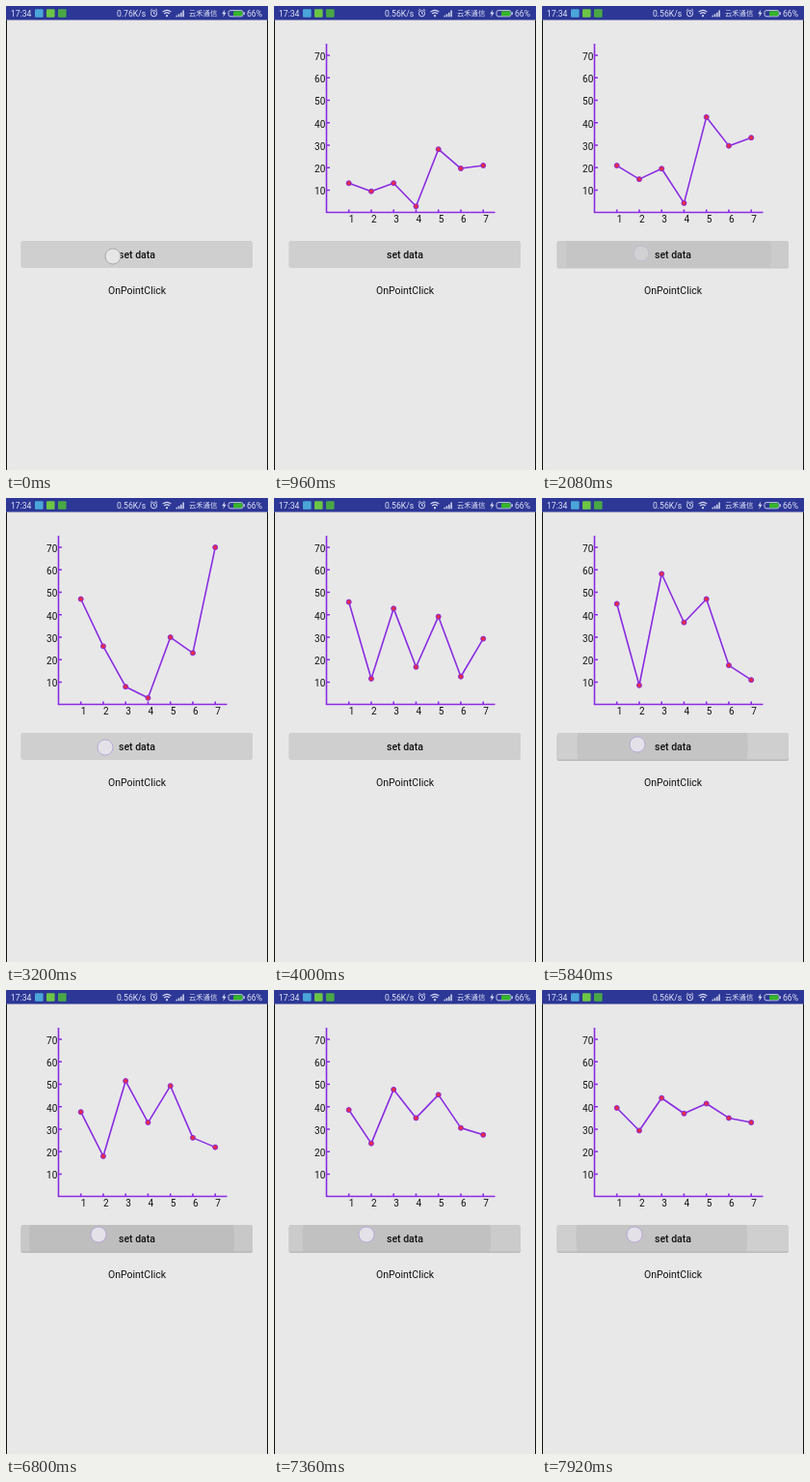
An HTML page for the animation above (8 s loop, 272 by 480 pixels).

```html
<!DOCTYPE html>
<html lang="en">
<head>
<meta charset="utf-8">
<title>Line chart</title>
<style>
  html, body { margin: 0; width: 100%; height: 100%; overflow: hidden; background: #e8e8e8; }
  svg { display: block; width: 272px; height: 480px; font-family: Roboto, sans-serif; }
  .status text { font-size: 8.6px; fill: #e2e5f7; }
  .status .carrier { font: 7.3px "Noto Sans CJK SC", "Noto Sans CJK", sans-serif; }
  .icon { fill: none; stroke: #d5d9f0; }
  .axes { fill: none; stroke: #8a2be2; stroke-width: 1.6; }
  .labels { font-size: 10px; fill: #111; }
  .label { font-size: 10.5px; fill: #111; text-anchor: middle; }
  #line { fill: none; stroke: #8a2be2; stroke-width: 1.6; stroke-linejoin: round; }
  #dots circle { fill: #e62b45; stroke: #8a2be2; stroke-width: 1; }
</style>
</head>
<body>
<svg viewBox="0 0 272 480">
  <defs><clipPath id="face"><rect x="15.5" y="243" width="240.5" height="27.5" rx="2"/></clipPath></defs>
  <rect width="272" height="480" fill="#e8e8e8"/>
  <g class="status">
    <rect width="272" height="14.5" fill="#2c3796"/>
    <text x="5" y="10.8">17:34</text>
    <rect x="30" y="3.2" width="8.6" height="8.6" rx="1" fill="#4aa6d8"/>
    <rect x="42" y="3.2" width="8.6" height="8.6" rx="1" fill="#6cc644"/>
    <rect x="54" y="3.2" width="8.6" height="8.6" rx="1" fill="#49a846"/>
    <text id="speed" x="115" y="10.8">0.76K/s</text>
    <g class="icon">
      <circle cx="153.5" cy="7.7" r="3.1"/>
      <path d="M153.5 5.8v2.2h1.6M149.8 4.8l2-1.7M157.2 4.8l-2-1.7" stroke-width=".9"/>
      <path d="M162.6 6.1q4.4-3.6 8.8 0M164.2 8q2.8-2.3 5.6 0" stroke-width="1.2"/>
      <path d="M177.2 11.3v-1.6M179.5 11.3v-3M181.8 11.3v-4.6M184.1 11.3v-6.8" stroke-width="1.5"/>
      <rect x="231" y="4.6" width="15" height="6.2" rx="2" stroke-width=".9"/>
    </g>
    <circle cx="167" cy="10.2" r="1.1" fill="#d5d9f0"/>
    <text class="carrier" x="190" y="10.4">云禾通信</text>
    <path d="M227.2 3.6l-3 4.6h2l-1 3.6 3.4-5h-2z" fill="#d5d9f0"/>
    <rect x="236" y="5.2" width="9.4" height="5" rx="1.2" fill="#35b52b"/>
    <rect x="246.6" y="6.3" width="1.2" height="2.8" fill="#d5d9f0"/>
    <text x="250" y="10.8">66%</text>
  </g>
  <g id="chart">
    <path class="axes" id="axes"/>
    <g class="labels" id="labels"></g>
    <polyline id="line"/>
    <g id="dots"></g>
  </g>
  <rect id="shadow" x="15.5" y="244" width="240.5" height="27.5" rx="2"/>
  <rect x="15.5" y="243" width="240.5" height="27.5" rx="2" fill="#cfcfcf"/>
  <g clip-path="url(#face)">
    <rect id="tint" x="15" y="242" width="242" height="30"/>
    <g id="ripples"></g>
  </g>
  <text class="label" x="136" y="260.6" font-weight="500">set data</text>
  <text class="label" x="136" y="297.6">OnPointClick</text>
  <circle id="touch" r="8" stroke-width="1"/>
  <path d="M.5 14.5V480M271.5 14.5V480" stroke="#111" stroke-width="1"/>
</svg>
<script>
const LOOP = 8000, STEP = 23.25;
const $ = id => document.getElementById(id);
const clamp = v => Math.max(0, Math.min(1, v));
const ease = p => (1 - Math.cos(Math.PI * p)) / 2;
const linear = p => p;
const px = i => 77.7 + STEP * i;
const py = v => 213.8 - v * 2.325;

function add(parent, name, attrs, text = '') {
  const el = document.createElementNS('http://www.w3.org/2000/svg', name);
  set(el, attrs);
  el.textContent = text;
  return parent.appendChild(el);
}
function set(el, attrs) {
  for (const key in attrs) el.setAttribute(key, attrs[key]);
}

const moves = [
  [360, 1360, ease, [20, 14.5, 20, 4.3, 43, 30, 32]],
  [1960, 2960, ease, [47, 26, 8, 3, 30, 23, 70]],
  [3400, 4400, ease, [45, 4, 61, 24, 44, 7, 8]],
  [5230, 5840, linear, [44.9, 8.6, 58.2, 36.6, 47, 17.5, 11]],
  [5840, 6800, linear, [37.7, 18, 51.5, 33, 49.3, 26.2, 22]],
  [6800, 7920, linear, [39.5, 29.4, 43.9, 37, 41.4, 35, 33]]
];

// seen: finger appears; down: ripple clock starts; up: finger lifts
const taps = [
  { seen: -80, down: -80, up: 330, x: 111, y: 259 },
  { seen: 1520, down: 1860, up: 1990, x: 103, y: 256 },
  { seen: 3160, down: 3160, up: 3400, x: 103, y: 258 }
];
for (let n = 0; n < 10; n++) {
  const down = 5096 + 297 * n;
  taps.push({ seen: down, down, up: down + 240, x: n < 3 ? 99 : 96, y: n < 3 ? 255 : 253 });
}

let axes = 'M54.5 39V213.5H229.5';
for (let i = 0; i < 7; i++) {
  const y = py(10 * (i + 1));
  axes += `M54.5 ${y}h3.5M${px(i)} 213.5v-3`;
  add($('labels'), 'text', { x: 53.3, y: y + 4.8, 'text-anchor': 'end' }, 10 * (i + 1));
  add($('labels'), 'text', { x: px(i) + 2.8, y: 223.6, 'text-anchor': 'middle' }, i + 1);
}
$('axes').setAttribute('d', axes);
const dots = Array.from({ length: 7 }, (_, i) => add($('dots'), 'circle', { cx: px(i), r: 2.5 }));
const ripples = taps.map(() => add($('ripples'), 'circle', { cy: 256 }));

function valuesAt(t) {
  let values = Array(7).fill(0);
  for (const [start, end, curve, goal] of moves) {
    if (t < start) break;
    const p = curve(clamp((t - start) / (end - start)));
    values = values.map((v, i) => v + (goal[i] - v) * p);
  }
  return values;
}

function drawChart(t) {
  $('chart').style.display = t < moves[0][0] ? 'none' : '';
  const values = valuesAt(t);
  $('line').setAttribute('points', values.map((v, i) => `${px(i)},${py(v)}`).join(' '));
  values.forEach((v, i) => dots[i].setAttribute('cy', py(v)));
}

function drawButton(t) {
  let tint = 0, press = 0, finger = 0;
  taps.forEach((tap, i) => {
    const age = t - tap.down;
    const fade = 1 - clamp((t - tap.up) / 200);
    const active = age >= 100 ? fade : 0;
    set(ripples[i], {
      cx: tap.x + (136 - tap.x) * clamp(0.7 + 0.0023 * (age - 150)),
      r: Math.max(0, 50 + 0.257 * age),
      'fill-opacity': 0.05 * active
    });
    tint = Math.max(tint, 0.035 * clamp((age - 150) / 70) * active);
    press = Math.max(press, active);
    if (t >= tap.seen && t < tap.up + 150) {
      finger = 1 - clamp((t - tap.up) / 150);
      set($('touch'), {
        cx: tap.x, cy: tap.y,
        fill: i ? '#e4e2e8' : '#e6e6e6',
        stroke: i ? '#b9a9d8' : '#a9a9a9'
      });
    }
  });
  set($('touch'), { opacity: finger });
  set($('tint'), { 'fill-opacity': tint });
  set($('shadow'), { y: 243.6 + 0.9 * press, 'fill-opacity': 0.1 + 0.1 * press });
}

function frame(now) {
  const t = now % LOOP;
  drawChart(t);
  drawButton(t);
  $('speed').textContent = t < 720 ? '0.76K/s' : '0.56K/s';
  requestAnimationFrame(frame);
}
frame(0);
</script>
</body>
</html>
```
